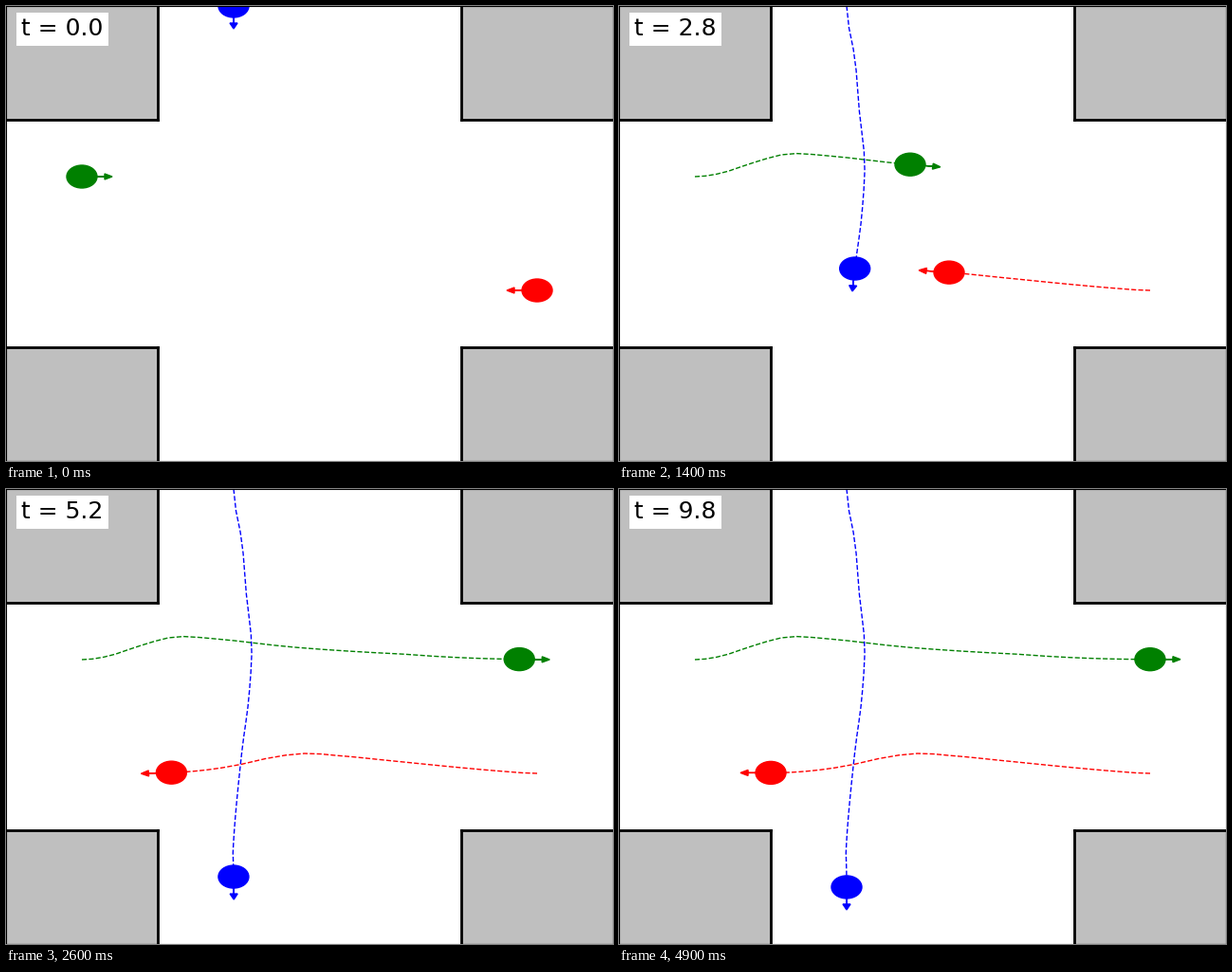
A matplotlib script that plays this animation: 640x480 px, repeating every 5 s.

```python
import numpy as np
import matplotlib.pyplot as plt
from matplotlib.animation import FuncAnimation
from matplotlib.patches import Circle, Rectangle

FRAMES, DT = 50, 0.2
RADIUS, SHAFT, HEAD = 0.1, 0.15, 0.05

# color: (waypoints as (time, x, y) in pixels, goal, closing rate near the goal)
ROUTES = {
    "red": ([(0, 560, 300), (0.5, 521, 297.6), (1, 482, 294.2), (2, 405, 286.6),
             (2.8, 348, 281.1), (3.2, 314.5, 279), (3.6, 273.5, 284.5)],
            (160, 299.4), 1.29),
    "green": ([(0, 80, 180), (0.5, 109, 176), (1, 142.5, 165), (1.5, 179, 155.9),
               (2, 222, 158.2), (2.8, 307, 167.2), (3.6, 419, 174.2)],
              (560, 179.7), 1.26),
    "blue": ([(0, 240, 0), (0.5, 248.9, 56.8), (1, 253.4, 111), (1.5, 259, 163.8),
              (2, 256.7, 212.5), (2.8, 248.7, 277), (3.6, 241.8, 346), (4.2, 239.3, 384)],
             (240, 420), 1.19),
}


def position(t, waypoints, goal, rate):
    """Cubic curve through the waypoints, then an exponential approach to the goal."""
    points = np.array(waypoints, float)
    times, places = points[:, 0], points[:, 1:]
    goal = np.array(goal)
    lateral = np.argmin(np.abs(goal - places[0]))
    slopes = np.gradient(places, times, axis=0, edge_order=2)
    slopes[0, lateral] = 0                      # every car starts along its lane

    i = np.clip(np.searchsorted(times, t, side="right") - 1, 0, len(times) - 2)
    h = (times[i + 1] - times[i])[:, None]
    u = np.minimum((t - times[i])[:, None] / h, 1)
    curve = ((1 + 2 * u) * (1 - u) ** 2 * places[i] + u * (1 - u) ** 2 * h * slopes[i]
             + u * u * (3 - 2 * u) * places[i + 1] + u * u * (u - 1) * h * slopes[i + 1])

    # The offset from the lane fades twice as fast as the distance to go.
    power = np.where(np.arange(2) == lateral, 2, 1)
    late = np.maximum(t - times[-1], 0)[:, None]
    approach = goal + (places[-1] - goal) * np.exp(-rate * late * power)
    return np.where(late > 0, approach, curve)


def drive(route):
    """Positions and unit headings for all frames, in data units."""
    t, step = np.arange(FRAMES) * DT, 1e-3
    scale = np.array([1 / 160, -1 / 120])
    here = position(t, *route)
    heading = (position(t + step, *route) - here) * scale
    heading /= np.linalg.norm(heading, axis=1, keepdims=True)
    return here * scale + [-2, 2], heading


fig = plt.figure(figsize=(6.4, 4.8), dpi=100)
ax = fig.add_axes([0, 0, 1, 1])
ax.set(xlim=(-2, 2), ylim=(-2, 2))

for sx in (-1, 1):
    for sy in (-1, 1):
        ax.add_patch(Rectangle((min(sx, 2 * sx), min(sy, 2 * sy)), 1, 1,
                               color="gray", alpha=0.5))
        ax.plot([sx, 2 * sx], [sy, sy], "k", lw=2)
        ax.plot([sx, sx], [sy, 2 * sy], "k", lw=2)

clock = ax.text(-1.9, 1.8, "", fontsize=18, va="center",
                bbox=dict(facecolor="white", edgecolor="none"))

cars = []
for color, route in ROUTES.items():
    body = ax.add_patch(Circle((0, 0), RADIUS, color=color))
    arrow = ax.arrow(0, 0, SHAFT, 0, width=0.001, head_width=0.05,
                     head_length=HEAD, color=color)
    trail, = ax.plot([], [], "--", color=color, lw=1)
    cars.append((*drive(route), body, arrow, trail))


def update(i):
    clock.set_text(f"t = {i * DT:.1f}")
    for path, heading, body, arrow, trail in cars:
        x, y = path[i]
        dx, dy = SHAFT * heading[i]
        body.center = x, y
        arrow.set_data(x=x, y=y, dx=dx, dy=dy)
        trail.set_data(*path[:i + 1].T)
    return []


anim = FuncAnimation(fig, update, frames=FRAMES, interval=100, repeat=True)
plt.show()
```
